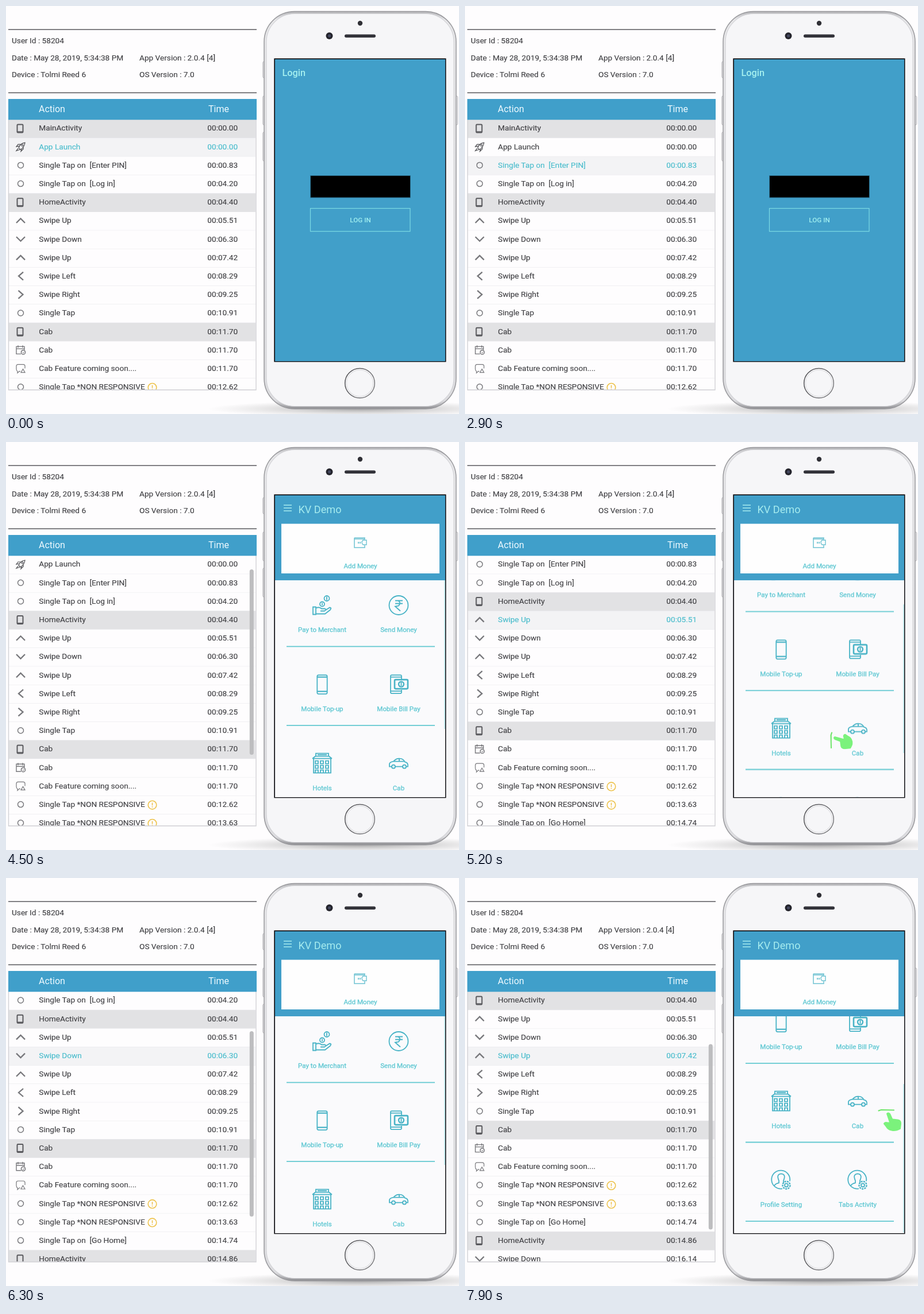
An HTML page for the animation above (8000 ms loop, 788 by 711 pixels).

```html
<!DOCTYPE html>
<html lang="en">
<head>
<meta charset="utf-8">
<title>Session replay</title>
<style>
html, body { margin: 0; width: 100%; height: 100%; overflow: hidden; background: #fefdfe; }
svg { display: block; width: 788px; height: 711px; font-family: Roboto, Arial, sans-serif; }
text { white-space: pre; }
.info { font-size: 13.65px; fill: #404044; stroke: #404044; stroke-width: .15; }
.head { font-size: 16px; fill: #eefaff; }
.row text { font-size: 13.65px; fill: #404044; stroke: #404044; stroke-width: .15; }
.row rect.bg { fill: #fefdfe; }
.row.screen rect.bg { fill: #e2e2e4; }
.row.on rect.bg { fill: #f3f3f5; }
.row.on text { fill: #48bccc; stroke: #48bccc; }
.icon { fill: none; stroke: #77777b; stroke-width: 1.5; }
.label { font-size: 11.6px; fill: #5cc6d1; stroke: #5cc6d1; stroke-width: .3; text-anchor: middle; }
.art { fill: none; stroke: #48b3c6; stroke-width: 1.8; }
.soft { filter: blur(.45px); }
</style>
</head>
<body>
<svg viewBox="0 0 788 711">
  <defs>
    <linearGradient id="edge" x2="0" y2="1">
      <stop offset="0" stop-color="#b5b5b8"/><stop offset=".02" stop-color="#e6e6e8"/>
      <stop offset=".98" stop-color="#dcdcdf"/><stop offset="1" stop-color="#8c8c90"/>
    </linearGradient>
    <linearGradient id="ring" x2="1" y2=".3">
      <stop offset="0" stop-color="#4c4c50"/><stop offset="1" stop-color="#77777b"/>
    </linearGradient>
    <radialGradient id="shade">
      <stop offset="0" stop-color="#777" stop-opacity=".65"/>
      <stop offset=".6" stop-color="#999" stop-opacity=".25"/>
      <stop offset="1" stop-color="#aaa" stop-opacity="0"/>
    </radialGradient>
    <clipPath id="listClip"><rect x="4" y="198" width="432" height="470.5"/></clipPath>
    <clipPath id="gridClip"><rect x="468" y="241" width="296" height="378"/></clipPath>
  </defs>
  <rect width="788" height="711" fill="#fefdfe"/>

  <path d="M4 41H436M4 151.3H436" stroke="#58585c" stroke-width="1.4"/>
  <g class="info">
    <text x="10" y="65">User Id : 58204</text>
    <text x="10" y="94.5">Date : May 28, 2019, 5:34:38 PM</text>
    <text x="232" y="94.5">App Version : 2.0.4 [4]</text>
    <text x="10" y="124">Device : Tolmi Reed 6</text>
    <text x="232" y="124">OS Version : 7.0</text>
  </g>
  <g clip-path="url(#listClip)">
    <g id="list"></g>
    <rect id="bar" x="423.8" width="7" height="323" rx="3.5" fill="#bdbdbf"/>
  </g>
  <path d="M4.5 198V669H435V198" fill="none" stroke="#cfcfd3" stroke-width="1.3"/>
  <rect x="4" y="162" width="432" height="36.3" fill="#409fca"/>
  <text class="head" x="57" y="185.3">Action</text>
  <text class="head" x="352" y="184.8">Time</text>

  <ellipse cx="616" cy="702" rx="265" ry="14" fill="url(#shade)"/>
  <g fill="#ececee" stroke="#a2a2a6" stroke-width=".8">
    <rect x="446.8" y="97" width="5" height="28" rx="1.5"/>
    <rect x="446.8" y="157" width="5" height="50" rx="1.5"/>
    <rect x="446.8" y="220" width="5" height="50" rx="1.5"/>
    <rect x="780.7" y="157" width="5" height="50" rx="1.5"/>
  </g>
  <rect x="449" y="9.5" width="334" height="692.5" rx="53" fill="url(#edge)" stroke="#98989c" stroke-width="1.5"/>
  <rect x="453" y="13.5" width="326" height="684" rx="49" fill="#f6f6f8" stroke="#d4d4d8" stroke-width="1.2"/>
  <circle cx="616" cy="30" r="4.2" fill="#303036"/>
  <circle cx="562.5" cy="52" r="6" fill="#24242c"/>
  <circle cx="562.5" cy="52" r="2.5" fill="#454960"/>
  <rect x="589" y="49.5" width="54" height="5.5" rx="2.7" fill="#33333a"/>
  <circle cx="615.5" cy="657.3" r="25.8" fill="#fbfbfc" stroke="url(#ring)" stroke-width="1.5"/>
  <circle cx="615.5" cy="657.3" r="23.2" fill="#f6f6f8" stroke="#dcdcdf" stroke-width="1.2"/>
  <rect x="466.3" y="91.3" width="299.2" height="529" fill="#0c0c10"/>

  <g id="login">
    <rect x="468" y="93" width="296" height="526" fill="#419fc9"/>
    <text x="480.5" y="121.8" font-size="16.3" font-weight="500" fill="#a5f0ef" class="soft">Login</text>
    <rect x="529.5" y="295.5" width="174" height="38.5" fill="#000" stroke="#2f7797"/>
    <rect x="529.5" y="352.7" width="173.5" height="40" fill="none" stroke="#7cdbe4" stroke-width="1.2"/>
    <text x="616.5" y="377.3" font-size="11.7" font-weight="500" fill="#a0eff0" text-anchor="middle" class="soft">LOG IN</text>
  </g>

  <g id="home">
    <rect x="468" y="93" width="296" height="526" fill="#fafafc"/>
    <g clip-path="url(#gridClip)">
      <g id="grid" class="soft"></g>
      <rect id="thumb" x="762.3" width="1.7" height="259" fill="#8fdbe0" opacity=".6"/>
    </g>
    <rect x="468" y="93" width="296" height="148" fill="#419fc9"/>
    <g class="soft">
      <path d="M483 110H497M483 115H497M483 120H497" stroke="#a5ebee" stroke-width="1.6"/>
      <text x="508.5" y="123.8" font-size="18.1" fill="#a5ebee">KV Demo</text>
      <rect x="479" y="142.5" width="275" height="86.5" fill="#fefefe"/>
      <g class="art" transform="translate(616 175)" stroke-opacity=".8">
        <path d="M-10-8H8V-5M-10-8V9H8V5M-10-6H8" stroke-width="1.5"/>
        <path d="M11-4H5Q1 0 5 4H11Z" stroke-width="1.4"/>
        <path d="M-3-1v3M0-1v3"/>
      </g>
      <text class="label" x="616.5" y="219.5">Add Money</text>
    </g>
  </g>

  <g id="swipe" fill="#7bf27c" class="soft">
    <path d="M-13.5 1L-9-.5L13 0" fill="none" stroke="#6fe56a" stroke-width="2.2" stroke-linecap="round"/>
    <path id="hand" d="M0 6Q3 2 7 6L11 15L20 16Q27 17 26 25L25 33Q16 38 9 36Q2 35-1 29L-5 24Q-4 19 3 21L5 21Z"/>
  </g>
</svg>
<script>
const LOOP = 8000, PITCH = 32.2, LAG = 350, MAX_SCROLL = 171;
const $ = id => document.getElementById(id);
const clamp = v => Math.max(0, Math.min(1, v));

const icons = {
  phone: '<rect x="19.5" y="-6.5" width="10" height="14" rx="1.3" stroke="#59595d" stroke-width="2"/><path d="M20 6H29" stroke="#59595d"/>',
  tap: '<circle cx="25.5" cy="0" r="5"/>',
  up: '<path d="M18 4L25.5-3.5L33 4" stroke-width="2.3"/>',
  down: '<path d="M18-4L25.5 3.5L33-4" stroke-width="2.3"/>',
  left: '<path d="M30-7L22 0L30 7" stroke-width="2.3"/>',
  right: '<path d="M21.5-7L29.5 0L21.5 7" stroke-width="2.3"/>',
  rocket: '<path d="M22 2Q25-6 33-7Q32 1 25 5ZM23-1L18 0L21-4L25-4M27 4L26 8L30 4L30 0M21 3L18 7L24 5" stroke="#4c4c50" stroke-width="1.2"/><circle cx="28.5" cy="-2.5" r="1.5"/>',
  cal: '<path d="M26 7H18V-6H32V0M18-2H32M21-8V-4M29-8V-4" stroke-width="1.4"/><circle cx="30" cy="4" r="3.6"/><path d="M28.5 4L30 5.5L32 3" stroke-width="1"/>',
  chat: '<path d="M25 5H23L20 8V5Q18 4 18 1V-4Q18-7 21-7H30Q33-7 33-4V0" stroke-width="1.2"/><path d="M29.5 1L33 7H26Z" stroke-width="1.2"/>'
};

const slow = 'Single Tap *NON RESPONSIVE';
const rows = [
  ['phone', 'MainActivity', '00.00'], ['rocket', 'App Launch', '00.00'],
  ['tap', 'Single Tap on  [Enter PIN]', '00.83'], ['tap', 'Single Tap on  [Log in]', '04.20'],
  ['phone', 'HomeActivity', '04.40'], ['up', 'Swipe Up', '05.51'],
  ['down', 'Swipe Down', '06.30'], ['up', 'Swipe Up', '07.42'],
  ['left', 'Swipe Left', '08.29'], ['right', 'Swipe Right', '09.25'],
  ['tap', 'Single Tap', '10.91'], ['phone', 'Cab', '11.70'],
  ['cal', 'Cab', '11.70'], ['chat', 'Cab Feature coming soon....', '11.70'],
  ['tap', slow, '12.62'], ['tap', slow, '13.63'],
  ['tap', 'Single Tap on  [Go Home]', '14.74'], ['phone', 'HomeActivity', '14.86'],
  ['down', 'Swipe Down', '16.14']
];
const warning = '<g fill="none" stroke="#edc24a" stroke-width="1.6"><circle cx="254.5" cy="1" r="7.3"/><path d="M254.5-3V2M254.5 3.5V5.2"/></g>';

$('list').innerHTML = rows.map(([icon, name, time], i) =>
  `<g class="row ${icon === 'phone' ? 'screen' : ''}" transform="translate(0 ${213 + i * PITCH})">
    <rect class="bg" x="5" y="-15" width="429" height="32.3"/>
    <path d="M5 17.2H434" stroke="#e6e6ea"/>
    <g class="icon">${icons[icon]}</g>
    <text x="57.3" y="4.4">${name}</text><text x="350.3" y="4.4">00:${time}</text>
    ${name === slow ? warning : ''}</g>`).join('');
const rowNodes = [...document.querySelectorAll('.row')];
const startOf = i => rows[i][2] * 1000 - LAG;

const mobile = '<rect x="-8.7" y="-16" width="17.4" height="33" rx="2.5"/><path d="M-8-12.5H8M-8 12.5H8" stroke-width="2.2"/>';
const profile = '<path d="M2 15A16 16 0 1 1 15 2M-12 10Q-10 6-4 5V1Q-9-10 0-11Q9-10 4 1V5"/><circle cx="9" cy="9" r="6.5" stroke-width="2.5" stroke-dasharray="3 1.4"/><circle cx="9" cy="9" r="3"/>';
let windows = '';
for (let y = -4; y < 15; y += 8)
  for (let x = -12; x < 12; x += 9) windows += `M${x} ${y}h5v5h-5Z`;
const tiles = [
  ['Pay to Merchant', '<path d="M-16 3V16H-11V3ZM-11 5Q-5 2-1 6H5Q8 8 4 10H-3M5 9L13 4Q17 4 14 8L5 15H-11"/><circle cx="0" cy="-2" r="4"/><circle cx="8" cy="-12" r="4.5"/><path d="M0-4V0M8-15V-9"/>'],
  ['Send Money', '<circle r="16.5"/><path d="M-6-8H7M-6-3H7M-6-8H-1Q5-5 0 1L-6 2L3 10"/>'],
  ['Mobile Top-up', mobile],
  ['Mobile Bill Pay', '<path d="M5-9V-14Q5-16 3 -16H-12Q-14-16-14-14V14Q-14 16-12 16H3Q5 16 5 14V10M-14 12H5M-14-12.5H5"/><rect x="-7" y="-8" width="23" height="16" rx="2" stroke-width="2.6"/><circle cx="4.5" cy="0" r="4.5" stroke-width="2.4"/><path d="M4.5-3V3M-4 0V.1M13 0V.1"/>'],
  ['Hotels', `<path d="M-15-8H15V17H-15ZM-17-8L-12-12H12L17-8M-11-12V-17H11V-12M-8-14.5H8${windows}"/>`],
  ['Cab', '<path d="M-12 6H-16V1Q-15-2-9-3Q-4-9 2-8Q8-8 11-2Q17-1 16 6H13M-6 6H7M-9-3H11M1-8V-3"/><circle cx="-9" cy="6" r="3"/><circle cx="10" cy="6" r="3"/>'],
  ['Profile Setting', profile],
  ['Tabs Activity', profile]
];
$('grid').innerHTML = tiles.map(([name, art], i) => {
  const y = 137.6 * (i >> 1), x = i % 2 ? 683 : 550;
  const rule = i % 2 ? '' : `<path d="M488 ${356.3 + y}H746" stroke="#62c8d0" stroke-width="1.8"/>`;
  return `<g class="art" transform="translate(${x} ${284.5 + y})">${art}</g>
    <text class="label" x="${x}" y="${331.3 + y}">${name}</text>${rule}`;
}).join('');

// start, end, direction of each gesture
const swipes = [[5050, 5330, 'up'], [5850, 6130, 'down'], [6960, 7240, 'up'], [7850, 8000, 'left']];
// start, from, to of each fling
const flings = [[5122, 0, MAX_SCROLL], [5890, MAX_SCROLL, 0], [7030, 0, MAX_SCROLL]];

function gridScroll(t) {
  const fling = flings.filter(f => t >= f[0]).pop();
  if (!fling) return 0;
  const [start, from, to] = fling;
  return from + (to - from) * (1 - (1 - clamp((t - start) / 400)) ** 2);
}

function drawSwipe(t) {
  const swipe = swipes.find(([a, b]) => t >= a && t < b);
  $('swipe').style.display = swipe ? '' : 'none';
  if (!swipe) return;
  const [start, , dir] = swipe;
  const move = (t - start) * .08;
  if (dir === 'left') {
    $('swipe').setAttribute('transform', 'translate(733 404.5)');
    $('hand').setAttribute('transform', `translate(${4 - move} 0)`);
  } else {
    const along = dir === 'up' ? 5 - move : move - 20;
    $('swipe').setAttribute('transform', 'matrix(0 1 1 0 637 520)');
    $('hand').setAttribute('transform', `translate(${along} 0) scale(.85 1.02)`);
  }
}

function draw(t) {
  let active = 1;
  while (startOf(active + 1) <= t) active++;
  rowNodes.forEach((node, i) => node.classList.toggle('on', i === active && rows[i][0] !== 'phone'));

  const shift = Math.max(0, active - 3);
  $('list').setAttribute('transform', `translate(0 ${-shift * PITCH})`);
  const age = t - startOf(active);
  $('bar').setAttribute('y', 199.5 + shift * 22.5);
  $('bar').setAttribute('opacity', shift ? clamp((age - 50) / 100) * clamp((1100 - age) / 200) : 0);

  const atHome = t >= startOf(4);
  $('login').style.display = atHome ? 'none' : '';
  $('home').style.display = atHome ? '' : 'none';
  const scroll = gridScroll(t);
  $('grid').setAttribute('transform', `translate(0 ${-scroll})`);
  $('thumb').setAttribute('y', 241 + scroll * .69);
  drawSwipe(t);
}

const origin = performance.now();
function tick() {
  draw((performance.now() - origin) % LOOP);
  requestAnimationFrame(tick);
}
tick();
</script>
</body>
</html>
```
